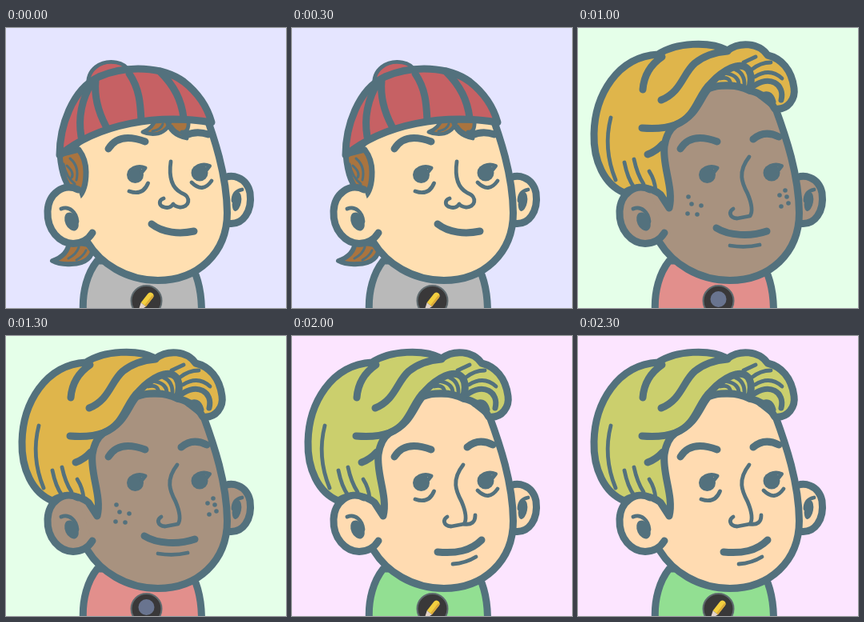
These frames come from a looping animation (350 by 350 pixels, 2.5 s). An HTML page:

```html
<!DOCTYPE html>
<html lang="en">
<head>
<meta charset="utf-8">
<title>Changing portraits</title>
<style>
  html, body { margin: 0; width: 100%; height: 100%; overflow: hidden; }
  svg { display: block; width: 100vw; height: 100vh; background: var(--bg);
    fill: none; stroke: #53717d; stroke-width: 9; stroke-linecap: round; stroke-linejoin: round; }
  .skin { fill: var(--skin); }
  .shirt { fill: var(--shirt); }
  .hair { fill: var(--hair); }
  .hat { fill: #c66164; }
  .ink { fill: #53717d; stroke: none; }
  .mid { stroke-width: 7; }
  .thin { stroke-width: 4.8; }
  .fine { stroke-width: 3; }
</style>
</head>
<body>
<svg viewBox="0 0 350 350">
  <path class="shirt" d="M96.5 355C95 329 102 306 114 291H228C240 308 244.500 331 244.500 355Z"/>

  <!-- badge -->
  <circle cx="175.5" cy="341" r="19" fill="#393839" stroke="#5f6a6e" stroke-width="2"/>
  <g data-looks="034" transform="translate(175.5 341) rotate(38)" stroke="none">
    <path fill="#f3cf3f" d="M-4-8Q-4-12 0-12Q4-12 4-8V6H-4Z"/>
    <path fill="#dba93a" d="M1.500-10H4V6H1.500Z"/>
    <path fill="#e3d3c8" d="M-4 6H4L1 14H-1Z"/>
  </g>
  <g data-looks="1" transform="translate(175.5 342) rotate(38) scale(1.25)" stroke="none">
    <path fill="#d3d6d7" d="M-3.500 16V-3C-9-7-8-14-3-16V-9L0-7L3-9V-16C8-14 9-7 3.500-3V16Z"/>
    <path fill="#5d6569" d="M-1.200 1H1.200V14H-1.200Z"/>
  </g>
  <circle data-looks="2" cx="175.5" cy="339" r="10" fill="#69748f" stroke="none"/>

  <!-- neck hair -->
  <g data-looks="01">
    <path class="hair" stroke-width="6" d="M58 291C70 287 78 279 79 267L110 272C108 288 98 295 82 295Q67 296 58 291Z"/>
    <path class="fine" d="M78 288Q88 283 91 274M88 290Q97 285 100 278"/>
  </g>

  <!-- head -->
  <path class="skin" d="M268 190C282 180 301 187 305 206C308 228 297 248 276 244Z"/>
  <path class="thin" d="M295 202Q284 204 284 216"/>
  <ellipse class="ink" cx="288.500" cy="217" rx="5.500" ry="12" transform="rotate(10 288 217)"/>
  <path class="skin" d="M246 98C260 136 276 183 276.500 231C276.500 282 239 315.500 190 315.500C150 315.500 118 294 102 268L82 240L84 205L78 166L84 150L152 72H213Z"/>

  <!-- eyes -->
  <g id="eye">
    <circle class="ink" cx="161.500" cy="183.500" r="10.500"/>
    <path class="thin" d="M160 175Q167 172 174 175Q171 179 169 181"/>
  </g>
  <use href="#eye" x="80.500" y="-2.500"/>
  <path class="thin" data-looks="034" d="M154 204Q171 210 177.500 194M232 193Q246 207 257 191"/>

  <!-- brows -->
  <path data-looks="0124" d="M128 151C139 133 158 136 174 142"/>
  <path data-looks="3" d="M136 159C146 142 162 142 181 149"/>
  <path data-looks="01" d="M225 134Q238 128 253 133"/>
  <path data-looks="234" d="M219 139Q233 127 251 136"/>

  <!-- noses -->
  <path class="thin" data-looks="0" d="M206 167C203 188 208 200 219 206C233 211 229 225 217 224Q211 223 209 220Q205 226 198 224C190 222 191 215 197 213"/>
  <path data-looks="13" d="M197 168C211 182 215 196 226 208Q231 216 222 220Q212 223 201 225"/>
  <path class="thin" data-looks="24" d="M214 161C199 180 205 194 212 207C217 219 219 229 215 235L199 238C188 237 189 229 194 226"/>
  <path class="thin" data-looks="4" d="M215 235Q229 237 229 224"/>

  <!-- mouths -->
  <path data-looks="0" d="M182 245C196 256 217 258 235 254"/>
  <g data-looks="14">
    <path d="M182 270C205 272 223 269 237 255"/>
    <path class="thin" d="M201 285Q217 284 230 276"/>
  </g>
  <g data-looks="23">
    <path d="M173 250C189 260 216 261 236 254"/>
    <path class="thin" d="M190 272Q210 275 227 271"/>
  </g>

  <path data-looks="123" stroke-width="5.600" d="M138 211h0M142 220h0M154 222h0M137 232h0M149 233h0M259 203h0M252 209h0M261 211h0M263 219h0M254 223h0"/>

  <!-- short hair and knitted cap -->
  <g data-looks="01">
    <path class="hair mid" d="M67 158C69 181 74 200 91 211C99 203 100 188 100 180Q100 164 91 152Z"/>
    <path class="fine" d="M72 170Q75 186 86 195M80 163Q92 173 88 190M76 172Q86 181 82 187"/>
    <path class="hair thin" d="M171 130Q184 125 187 113H206Q204 128 190 132Q180 134 171 130ZM201 116Q205 134 226 138L220 130Q229 131 228 116Z"/>
    <path class="fine" d="M183 129Q194 127 196 120M207 122Q212 130 220 132"/>
    <path class="hat thin" d="M103 74C100 51 119 40 138 43Q149 45 153 53Z"/>
    <path class="hat" d="M67 159C67 124 82 77 116 61C151 46 196 48 222 67C241 82 252 100 257 118C190 107 116 119 67 159Z"/>
    <path d="M108 67C95 88 90 112 94 136M112 66C110 88 116 106 125 123M154 57C167 76 168 95 169 115M192 54C211 73 219 90 222 112"/>
  </g>

  <!-- swept hair -->
  <g data-looks="234">
    <path class="hair" d="M114 225C120 200 105 172 108 148C110 134 115 126 122 121C149 110 152 88 163 76C176 70 198 70 214 78C227 81 239 88 246 101C263 103 272 88 270 75C267 52 254 38 237 34C226 18 202 17 187 28C165 16 122 18 100 33C49 36 21 84 20 132C19 166 33 196 58 206C72 196 94 200 103 208Z"/>
    <path d="M81 77Q83 51 105 36M104 90C129 80 131 57 146 44Q162 31 187 29M80 125Q106 127 122 121C149 110 149 84 166 69C181 53 203 40 213 52Q219 61 214 78M87 158Q98 154 106 145"/>
    <path class="thin" d="M41 112Q31 151 47 190M58 168Q62 188 70 199M70 164Q74 183 82 195M89 179Q96 190 97 203"/>
    <path class="thin" d="M178 63Q190 60 191 71M187 57Q202 60 201 73M197 52Q209 57 208 73M207 43L222 36M217 52Q228 43 241 43M221 61Q240 49 255 63"/>
    <path class="mid" d="M219 73C239 58 259 70 254 90M228 85Q240 78 244 92"/>
  </g>

  <!-- near ear -->
  <path class="skin" d="M90 202C72 193 53 207 52 229C51 253 67 269 84 269.500Q100 269 108 256"/>
  <path class="thin" d="M69 226C79 222 88 230 89 242"/>
  <ellipse class="ink" cx="82" cy="242" rx="8" ry="12" transform="rotate(-25 82 242)"/>
</svg>
<script>
  const STEP = 500;
  const svg = document.querySelector('svg');
  const parts = document.querySelectorAll('[data-looks]');
  const looks = [
    { bg: '#e5e5ff', skin: '#ffdfb1', shirt: '#b9b9b9', hair: '#a9743f' },
    { bg: '#efe5ff', skin: '#ffdcb1', shirt: '#92df92', hair: '#a9743f' },
    { bg: '#e5ffe9', skin: '#a8927f', shirt: '#e28f8c', hair: '#dfb54b' },
    { bg: '#eaffe5', skin: '#ffddb0', shirt: '#de8e8e', hair: '#b0bdc3' },
    { bg: '#fce5ff', skin: '#ffdbb1', shirt: '#92df92', hair: '#cbcf6d' }
  ];
  let shown = -1;

  function show(look) {
    for (const [name, color] of Object.entries(looks[look])) svg.style.setProperty('--' + name, color);
    for (const part of parts) part.style.display = part.dataset.looks.includes(look) ? '' : 'none';
    shown = look;
  }

  function tick() {
    const look = Math.floor(performance.now() / STEP) % looks.length;
    if (look !== shown) show(look);
    requestAnimationFrame(tick);
  }
  tick();
</script>
</body>
</html>
```
